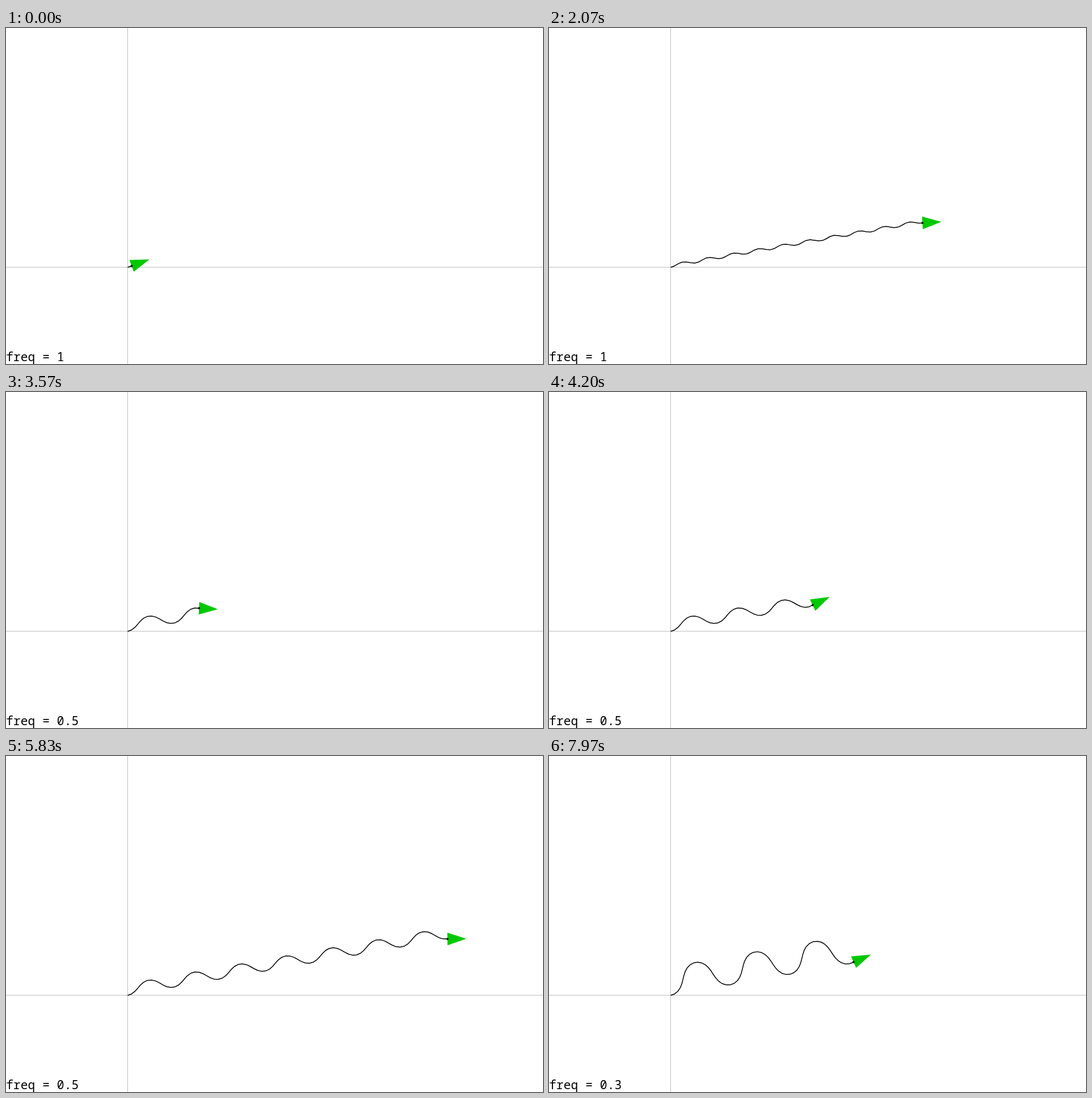
An HTML page for the animation above (8 s loop, 947 by 592 pixels).

```html
<!DOCTYPE html>
<html lang="en">
<head>
<meta charset="utf-8">
<title>Oscillating heading</title>
<style>
  html, body { margin: 0; width: 100%; height: 100%; overflow: hidden; background: #fff; }
  svg { display: block; width: 100%; height: 100%; }
  text { font: 21.4px "Noto Sans Mono", "DejaVu Sans Mono", monospace; white-space: pre; }
</style>
</head>
<body>
<svg viewBox="0 0 947 592">
  <path d="M0 421.5H947M214.5 0V592" stroke="#bebebe" fill="none"/>
  <path id="trail" fill="none" stroke="#000" stroke-width="1.5" stroke-linejoin="round"/>
  <g id="walker">
    <path d="M0 -11.1L33.3 0L0 11.1Z" fill="#00c800"/>
    <circle r="1.9"/>
  </g>
  <text id="label" x="0" y="587"></text>
</svg>
<script>
  const UNIT = 947 / 128;
  const ORIGIN = { x: 29 * UNIT, y: 57 * UNIT };
  const TURN = 20;            // largest turn per step, degrees
  const STEPS_PER_RUN = 88;
  const FREQS = [1, 0.5, 0.3];
  const LOOP_MS = 8000;

  const trail = document.getElementById("trail");
  const walker = document.getElementById("walker");
  const label = document.getElementById("label");
  let shown = -1;

  // Turn by a cosine of the step number, then move one unit ahead.
  function walk(freq, steps) {
    let { x, y } = ORIGIN;
    let heading = 0;
    let path = `M${x} ${y}`;
    for (let i = 0; i < steps; i++) {
      heading += TURN * Math.cos(freq * i);
      const angle = heading * Math.PI / 180;
      x += UNIT * Math.cos(angle);
      y -= UNIT * Math.sin(angle);
      path += `L${x.toFixed(2)} ${y.toFixed(2)}`;
    }
    return { x, y, heading, path };
  }

  function draw(tick) {
    const freq = FREQS[Math.floor(tick / STEPS_PER_RUN)];
    const { x, y, heading, path } = walk(freq, tick % STEPS_PER_RUN + 1);
    trail.setAttribute("d", path);
    walker.setAttribute("transform", `translate(${x} ${y}) rotate(${-heading})`);
    label.textContent = `freq = ${freq}`;
  }

  // 30 ticks a second, aligned to hundredths of a second.
  function update() {
    const hundredths = Math.floor(performance.now() % LOOP_MS / 10);
    const tick = Math.floor((hundredths + 0.5) * 0.3);
    if (tick !== shown) draw(shown = tick);
    requestAnimationFrame(update);
  }
  update();
</script>
</body>
</html>
```
